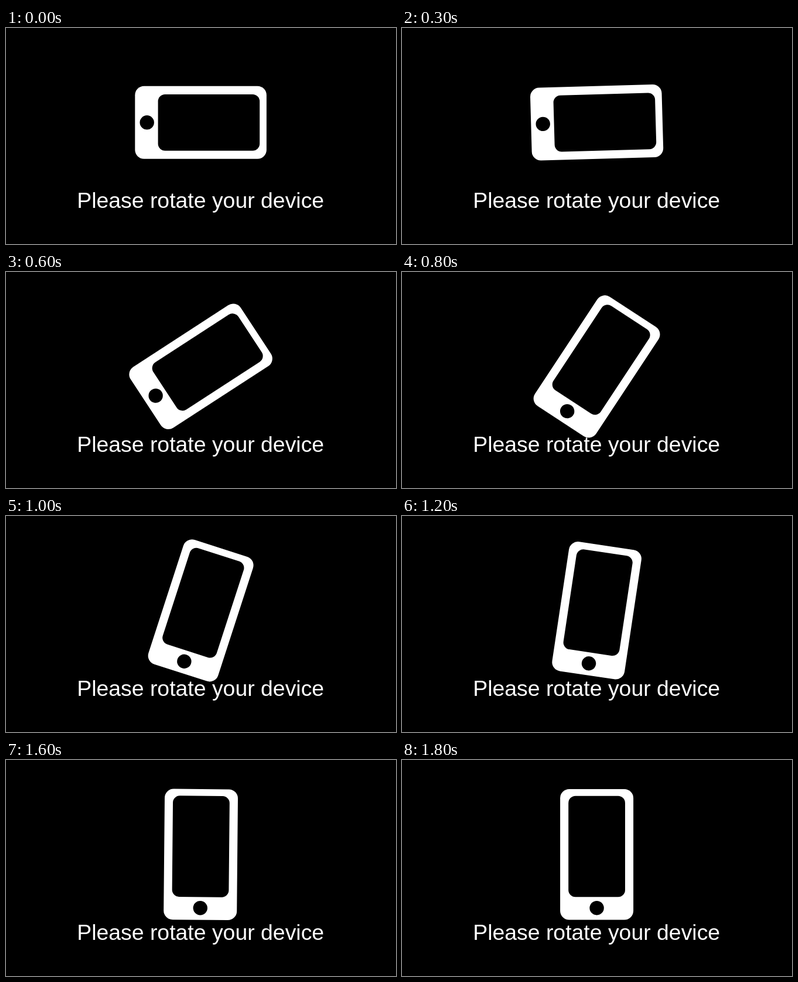
Recreate the animation shown at these times as an HTML page with a canvas. Size 666 by 371 pixels, loop 2.3 s.

```html
<!DOCTYPE html>
<html lang="en">
<head>
<meta charset="utf-8">
<title>Rotate device</title>
<style>
  html, body { margin: 0; width: 100%; height: 100%; overflow: hidden; background: #000; }
  canvas { display: block; }
</style>
</head>
<body>
<canvas id="stage" width="666" height="371"></canvas>
<script>
const ctx = document.getElementById('stage').getContext('2d');
const LOOP = 2300, STEP = 100;
const TURN_START = 252, TURN_LENGTH = 1500;
const CENTER = { x: 332.6, y: 162.3 };

// Cubic Bezier ease (.25, .1, .25, 1), solved for x by bisection.
function ease(x) {
  if (x <= 0) return 0;
  if (x >= 1) return 1;
  const curve = (a, b, s) => 3 * a * s * (1 - s) ** 2 + 3 * b * s * s * (1 - s) + s ** 3;
  let low = 0, high = 1;
  for (let i = 0; i < 30; i++) {
    const mid = (low + high) / 2;
    if (curve(0.25, 0.25, mid) < x) low = mid; else high = mid;
  }
  return curve(0.1, 1, low);
}

function roundRect(x, y, w, h, r, color) {
  ctx.fillStyle = color;
  ctx.beginPath();
  ctx.roundRect(x, y, w, h, r);
  ctx.fill();
}

function drawPhone(angle) {
  ctx.save();
  ctx.translate(CENTER.x, CENTER.y);
  ctx.rotate(-angle);
  roundRect(-112.3, -62.5, 224.6, 125, 15.5, '#fff');
  roundRect(-73, -48.4, 173.6, 96.8, 12, '#000');
  ctx.beginPath();
  ctx.arc(-91.9, 0, 12.2, 0, Math.PI * 2);
  ctx.fill();
  ctx.restore();
}

function drawText() {
  ctx.font = '37.4px "Liberation Sans", Arial, sans-serif';
  ctx.fillStyle = '#fff';
  ctx.fillText('Please rotate your device', 121.2, 309);
}

function draw(time) {
  const held = Math.floor((time % LOOP) / STEP) * STEP;
  ctx.fillStyle = '#000';
  ctx.fillRect(0, 0, 666, 371);
  drawPhone(ease((held - TURN_START) / TURN_LENGTH) * Math.PI / 2);
  drawText();
}

const start = performance.now();
function tick() {
  draw(performance.now() - start);
  requestAnimationFrame(tick);
}
tick();
</script>
</body>
</html>
```
